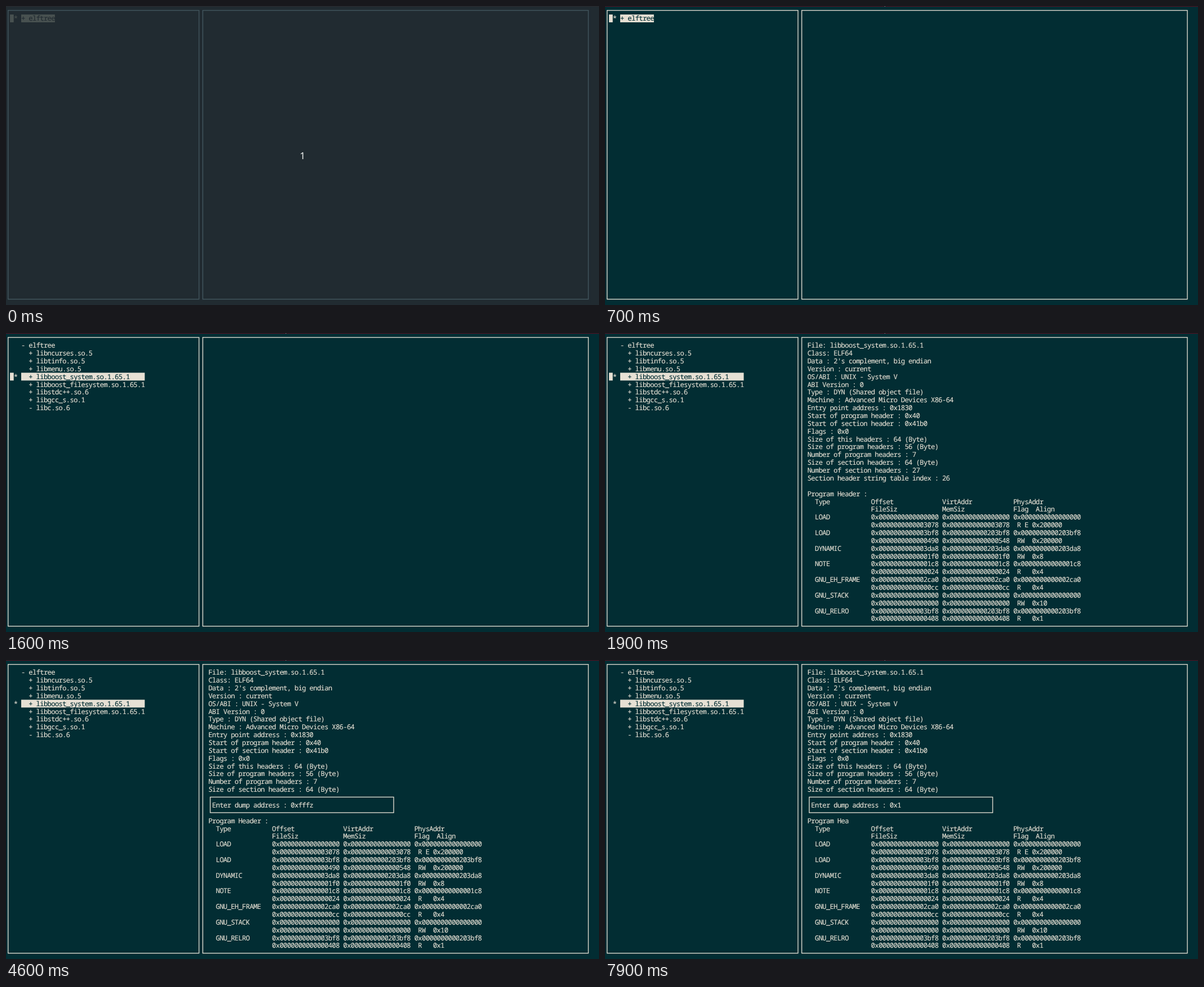
An HTML page for the animation above (8000 ms loop, 1054 px wide and 531 px high).

```html
<!DOCTYPE html>
<html lang="en">
<head>
<meta charset="utf-8">
<title>elftree</title>
<style>
  html, body { margin: 0; width: 100%; height: 100%; overflow: hidden; }
  svg {
    --bg: #022d33; --fg: #e6e0d4; --line: #e6e0d4; --strip: #5c0a1c; --tick: #8f9a94;
    display: block; width: 1054px; height: 531px; background: var(--bg);
    font: 12.2px "Noto Sans Mono", "DejaVu Sans Mono", monospace;
    text-rendering: geometricPrecision; font-variant-ligatures: none;
  }
  svg.dim { --bg: #212b31; --fg: #485150; --line: #445860; --strip: #2b2a2e; --tick: #2b2a2e; }
  text { white-space: pre; fill: var(--fg); stroke: var(--fg); stroke-width: 0.15px; }
  text.mark { fill: var(--bg); stroke: var(--bg); }
  .fill { fill: var(--fg); }
  .back { fill: var(--bg); }
  .frame { fill: none; stroke: var(--line); stroke-width: 1.33px; }
  .strip { fill: var(--strip); }
  .tick { fill: var(--tick); }
  text.count {
    fill: #f1f3f1; stroke: none; text-anchor: middle; letter-spacing: 0;
    font: 17px "Noto Sans", "Open Sans", sans-serif;
  }
</style>
</head>
<body>
<svg viewBox="0 0 1054 531"></svg>
<script>
const LOOP = 8000, CELL = 6.654, ROW = 13.86, LEFT = 0.4, TOP = 15.1;
const BASELINE = 11.2, MID_X = 3.3, MID_Y = 6.6;
const x = col => LEFT + col * CELL;
const y = row => TOP + row * ROW;
const stage = document.querySelector("svg");

function set(el, attrs) {
  for (const name in attrs) el.setAttribute(name, attrs[name]);
  return el;
}

function add(tag, attrs, parent = stage) {
  const el = document.createElementNS("http://www.w3.org/2000/svg", tag);
  return parent.appendChild(set(el, attrs));
}

// Fit the letter pitch to the terminal grid.
const probe = add("text", {});
probe.textContent = "0".repeat(100);
const spacing = CELL - probe.getComputedTextLength() / 100;
probe.remove();
stage.style.letterSpacing = spacing + "px";

const place = (el, col, row) => set(el, { x: x(col), y: y(row) + BASELINE });

function text(col, row, str = "") {
  const el = place(add("text", {}), col, row);
  el.textContent = str;
  return el;
}

const cells = (el, col, row, cols, rows = 1) =>
  set(el, { x: x(col), y: y(row), width: cols * CELL, height: rows * ROW });

// A window of whole cells whose border runs through the middle of its outer cells.
function panel(col, row, cols, rows) {
  const g = add("g", {});
  cells(add("rect", { class: "back" }, g), col, row, cols, rows);
  add("rect", {
    class: "frame", x: x(col) + MID_X, y: y(row) + MID_Y,
    width: (cols - 1) * CELL, height: (rows - 1) * ROW
  }, g);
  return g;
}

const libs = ["+ libncurses.so.5", "+ libtinfo.so.5", "+ libmenu.so.5",
  "+ libboost_system.so.1.65.1", "+ libboost_filesystem.so.1.65.1",
  "+ libstdc++.so.6", "+ libgcc_s.so.1", "- libc.so.6"];

const info = `File: libboost_system.so.1.65.1
Class: ELF64
Data : 2's complement, big endian
Version : current
OS/ABI : UNIX - System V
ABI Version : 0
Type : DYN (Shared object file)
Machine : Advanced Micro Devices X86-64
Entry point address : 0x1830
Start of program header : 0x40
Start of section header : 0x41b0
Flags : 0x0
Size of this headers : 64 (Byte)
Size of program headers : 56 (Byte)
Number of program headers : 7
Size of section headers : 64 (Byte)
Number of section headers : 27
Section header string table index : 26`;

// type, offset, address, file size, memory size, flags, alignment
const segments = [
  ["LOAD", "0", "0", "3078", "3078", "R E", "200000"],
  ["LOAD", "3bf8", "203bf8", "490", "548", "RW", "200000"],
  ["DYNAMIC", "3da8", "203da8", "1f0", "1f0", "RW", "8"],
  ["NOTE", "1c8", "1c8", "24", "24", "R", "4"],
  ["GNU_EH_FRAME", "2ca0", "2ca0", "cc", "cc", "R", "4"],
  ["GNU_STACK", "0", "0", "0", "0", "RW", "10"],
  ["GNU_RELRO", "3bf8", "203bf8", "408", "408", "R", "1"]
];
const hex = s => "0x" + s.padStart(16, "0");
const line = (type, a, b, c) => "  " + type.padEnd(15) + a.padEnd(19) + b.padEnd(19) + c;
const table = [
  line("Type", "Offset", "VirtAddr", "PhysAddr"),
  line("", "FileSiz", "MemSiz", "Flag  Align"),
  ...segments.flatMap(([type, off, addr, size, mem, flags, align]) => [
    line(type, hex(off), hex(addr), hex(addr)),
    line("", hex(size), hex(mem), ` ${flags.padEnd(3)} 0x${align}`)
  ])
];

panel(0, -1, 52, 38);
panel(52, -1, 104, 38);
add("rect", { class: "strip", width: 1054, height: 1 });
add("rect", { class: "tick", x: 497, width: 1, height: 1 });

const bar = add("rect", { class: "fill" });
const cursor = add("rect", { class: "fill" });
const star = text(2, 0, "*");
const root = text(4, 0);
const items = libs.map((name, i) => text(6, i + 1, name));
const details = [
  ...info.split("\n").map((s, i) => text(54, i, s)),
  ...table.map((s, i) => text(54, 20 + i, s))
];
const heading = text(54, 19);
const dialog = panel(54, 16, 50, 3);
const prompt = text(55, 17);
const popup = panel(65, 17, 18, 3);
const message = text(66, 18, "Invalid address!");
const count = add("text", { class: "count", x: 527, y: 272 });
count.textContent = "1";

const steps = [
  [0, { dim: true, row: 0, cursor: true, open: false, info: false,
        heading: "Program Header :", entry: null, error: false }],
  [100, { dim: false }],
  [500, { cursor: false }],
  [700, { cursor: true }],
  [1000, { open: true }],
  [1200, { row: 1 }],
  [1400, { row: 3 }],
  [1600, { row: 4 }],
  [1900, { info: true }],
  [2400, { cursor: false }],
  [2800, { cursor: true }],
  [3000, { cursor: false, entry: "0x" }],
  [3900, { entry: "0xf" }],
  [4000, { entry: "0xff" }],
  [4100, { entry: "0xfff" }],
  [4600, { entry: "0xfffz" }],
  [4700, { entry: "0xfffzx" }],
  [4900, { entry: "0xfffzxc" }],
  [5100, { entry: "0xfffzxcv" }],
  [5300, { error: true, heading: "Program Hea" }],
  [5800, { error: false, entry: "0x" }],
  [7900, { entry: "0x1" }]
];

const show = (on, ...els) => els.forEach(el => el.style.display = on ? "" : "none");

function render(s) {
  stage.classList.toggle("dim", s.dim);
  show(s.dim, count);
  root.textContent = (s.open ? "-" : "+") + " elftree";
  [root, ...items].forEach((el, i) => el.classList.toggle("mark", i === s.row));
  show(s.open, ...items);
  cells(bar, 4, s.row, s.open ? 33 : 9);
  cells(cursor, 1, s.row, 1);
  show(s.cursor, cursor);
  place(star, 2, s.row);
  heading.textContent = s.heading;
  show(s.info, heading, ...details);
  show(s.entry !== null, dialog, prompt);
  prompt.textContent = "Enter dump address : " + s.entry;
  show(s.error, popup, message);
}

const start = performance.now();
let shown = 0;
function tick() {
  const t = (performance.now() - start) % LOOP;
  const past = steps.filter(([at]) => at <= t);
  if (past.length !== shown) {
    shown = past.length;
    render(Object.assign({}, ...past.map(step => step[1])));
  }
  requestAnimationFrame(tick);
}
tick();
</script>
</body>
</html>
```
